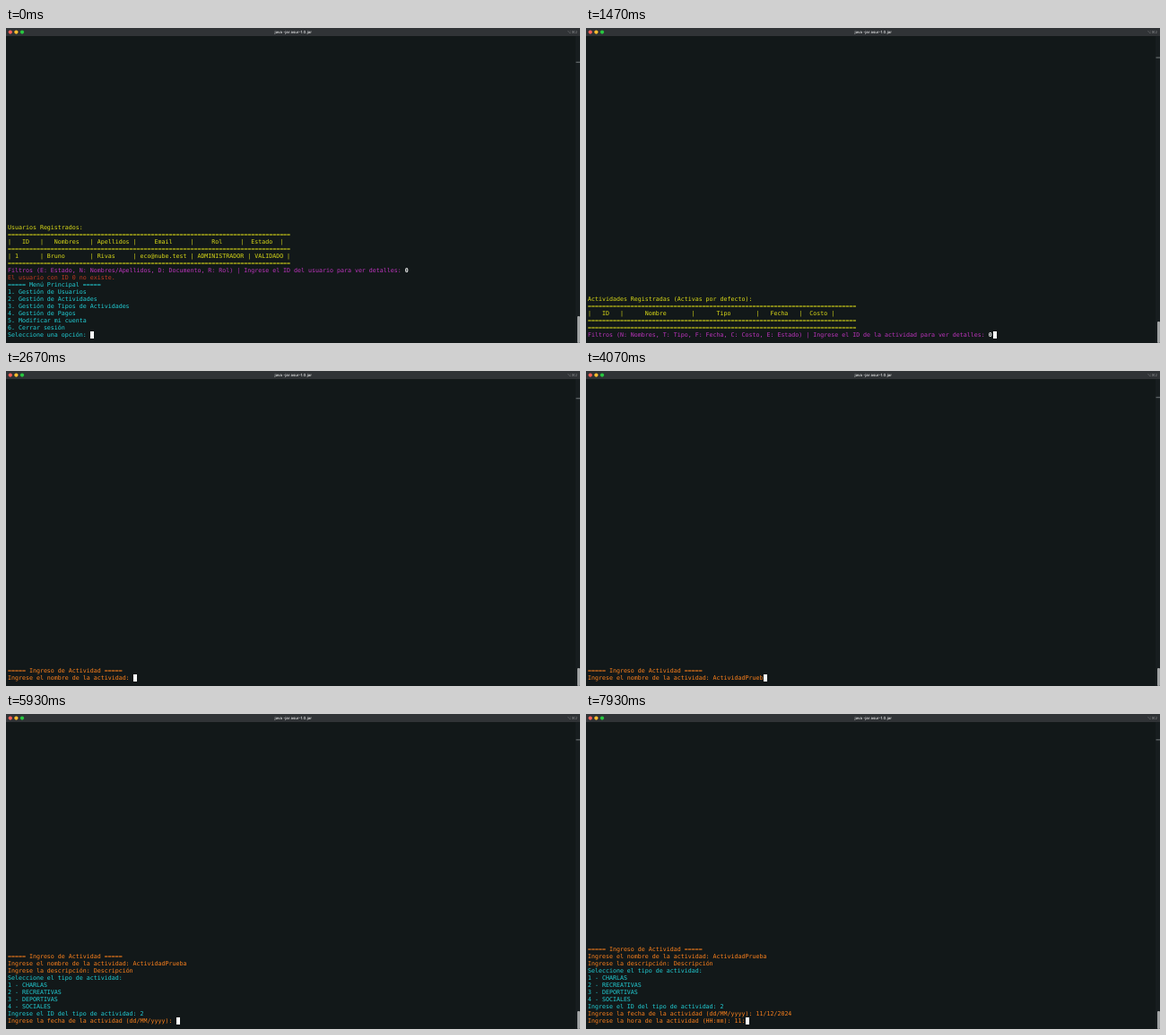
These frames come from a looping animation (640 by 352 pixels, 8000 ms). An HTML page:

```html
<!DOCTYPE html>
<html lang="es">
<head>
<meta charset="utf-8">
<title>Terminal</title>
<style>
  html, body { margin: 0; width: 100%; height: 100%; overflow: hidden; background: #121819; }
  svg { display: block; width: 100vw; height: 100vh; }
  text { white-space: pre; text-rendering: geometricPrecision; }
  #rows { font: 6.644px "DejaVu Sans Mono", monospace; }
</style>
</head>
<body>
<svg viewBox="0 0 640 352">
  <rect width="640" height="352" fill="#121819"/>
  <rect x="635" y="9" width="5" height="343" fill="#171d1f"/>
  <rect id="mark" x="635.5" width="4.5" height="1.4" fill="#5b6163"/>
  <rect id="thumb" x="637" width="3" rx="1" fill="#a0a3a4"/>
  <rect width="640" height="9" fill="#303336"/>
  <circle cx="4.8" cy="4.6" r="2.1" fill="#ff5f57"/>
  <circle cx="11.4" cy="4.6" r="2.1" fill="#febc2e"/>
  <circle cx="18" cy="4.6" r="2.1" fill="#28c840"/>
  <text x="320.3" y="6.1" text-anchor="middle" font-family="Inter, sans-serif" font-size="4.3" font-weight="600" fill="#d4d5d6">java -jar asur-1.0.jar</text>
  <text x="637" y="6" text-anchor="end" font-family="DejaVu Sans, sans-serif" font-size="4" fill="#85888a">⌥⌘2</text>
  <g id="rows"></g>
  <rect id="cursor" y="339" width="4" height="8" fill="#fff"/>
</svg>
<script>
const LOOP = 8000, CELL = 4, ROW = 8, LEFT = 2, BASE = 345;
const YELLOW = '#dcdc18', MAGENTA = '#bd34bd', RED = '#c23a20',
      CYAN = '#22cfd6', ORANGE = '#ff821c', WHITE = '#f4f4f4';
const $ = id => document.getElementById(id);

const paint = (color, text) => text.split('\n').map(s => ({ color, text: s }));
const ask = (color, text, input = '', inputColor = color) => [{ color, text, input, inputColor }];

// Part of s typed at time t, first key at a and last key at b.
function typed(s, t, a, b = a) {
  if (t < a) return '';
  if (t >= b) return s;
  return s.slice(0, 1 + Math.floor((t - a) / (b - a) * (s.length - 1)));
}

const rule = n => '='.repeat(n);
const users = [
  ...paint(YELLOW, [
    'Usuarios Registrados:',
    rule(79),
    '|   ID   |   Nombres   | Apellidos |     Email     |     Rol     |  Estado  |',
    rule(79),
    '| 1      | Bruno       | Rivas     | eco@nube.test | ADMINISTRADOR | VALIDADO |',
    rule(79)
  ].join('\n')),
  ...ask(MAGENTA, 'Filtros (E: Estado, N: Nombres/Apellidos, D: Documento, R: Rol) | Ingrese el ID del usuario para ver detalles: ', '0', WHITE),
  ...paint(RED, 'El usuario con ID 0 no existe.')
];

const menu = input => [
  ...paint(CYAN, `===== Menú Principal =====
1. Gestión de Usuarios
2. Gestión de Actividades
3. Gestión de Tipos de Actividades
4. Gestión de Pagos
5. Modificar mi cuenta
6. Cerrar sesión`),
  ...ask(CYAN, 'Seleccione una opción: ', input)
];

const activities = input => [
  ...paint(YELLOW, [
    'Actividades Registradas (Activas por defecto):',
    rule(75),
    '|   ID   |      Nombre       |      Tipo       |   Fecha   |  Costo |',
    rule(75),
    rule(75)
  ].join('\n')),
  ...ask(MAGENTA, 'Filtros (N: Nombres, T: Tipo, F: Fecha, C: Costo, E: Estado) | Ingrese el ID de la actividad para ver detalles: ', input, WHITE)
];

function form(t) {
  const name = typed('Ac', t, 3000, 3130) + typed('tividadPrueb', t, 3270, 4060) + typed('a', t, 4130);
  const rows = [
    ...paint(ORANGE, '===== Ingreso de Actividad ====='),
    ...ask(ORANGE, 'Ingrese el nombre de la actividad: ', name)
  ];
  if (t >= 4400) rows.push(...ask(ORANGE, 'Ingrese la descripción: ', typed('Descripción', t, 4920, 5400)));
  if (t >= 5500) rows.push(
    ...paint(CYAN, 'Seleccione el tipo de actividad:\n1 - CHARLAS\n2 - RECREATIVAS\n3 - DEPORTIVAS\n4 - SOCIALES'),
    ...ask(CYAN, 'Ingrese el ID del tipo de actividad: ', typed('2', t, 5670)));
  if (t >= 5870) rows.push(...ask(ORANGE, 'Ingrese la fecha de la actividad (dd/MM/yyyy): ', typed('11/12/2024', t, 6070, 6930)));
  if (t >= 7200) rows.push(...ask(ORANGE, 'Ingrese la hora de la actividad (HH:mm): ', typed('11:', t, 7600, 7920)));
  return rows;
}

function screen(t) {
  if (t < 530) return [...users, ...menu(typed('2', t, 200))];
  if (t < 1670) return activities(typed('0', t, 1330));
  if (t < 2660) return [
    ...activities('0'),
    ...paint(RED, 'La actividad con ID 0 no existe.'),
    ...menu(typed('2', t, 2070))
  ];
  return form(t);
}

// Scrollback position: [start time, mark y, thumb top]
const scroll = [[0, 37.6, 322], [530, 32.4, 328], [1670, 31.4, 330], [2660, 29.9, 332], [3270, 28.8, 332], [5500, 28.1, 332]];

function span(text, color, bold) {
  const el = document.createElementNS('http://www.w3.org/2000/svg', 'tspan');
  el.textContent = text;
  el.setAttribute('fill', color);
  if (bold) el.setAttribute('font-weight', 'bold');
  return el;
}

let shown = '';
function draw(t) {
  const rows = screen(t);
  const [, mark, thumb] = scroll.filter(s => s[0] <= t).pop();
  $('mark').setAttribute('y', mark);
  $('thumb').setAttribute('y', thumb);
  $('thumb').setAttribute('height', 352 - thumb);

  const key = JSON.stringify(rows);
  if (key === shown) return;
  shown = key;
  $('rows').replaceChildren(...rows.map((row, i) => {
    const el = document.createElementNS('http://www.w3.org/2000/svg', 'text');
    el.setAttribute('x', LEFT);
    el.setAttribute('y', BASE - (rows.length - 1 - i) * ROW);
    el.append(span(row.text, row.color));
    if (row.input) el.append(span(row.input, row.inputColor, row.inputColor === WHITE));
    return el;
  }));
  const last = rows[rows.length - 1];
  $('cursor').setAttribute('x', LEFT + CELL * (last.text + last.input).length);
}

const start = performance.now();
function tick() {
  draw((performance.now() - start) % LOOP);
  requestAnimationFrame(tick);
}
tick();
</script>
</body>
</html>
```
